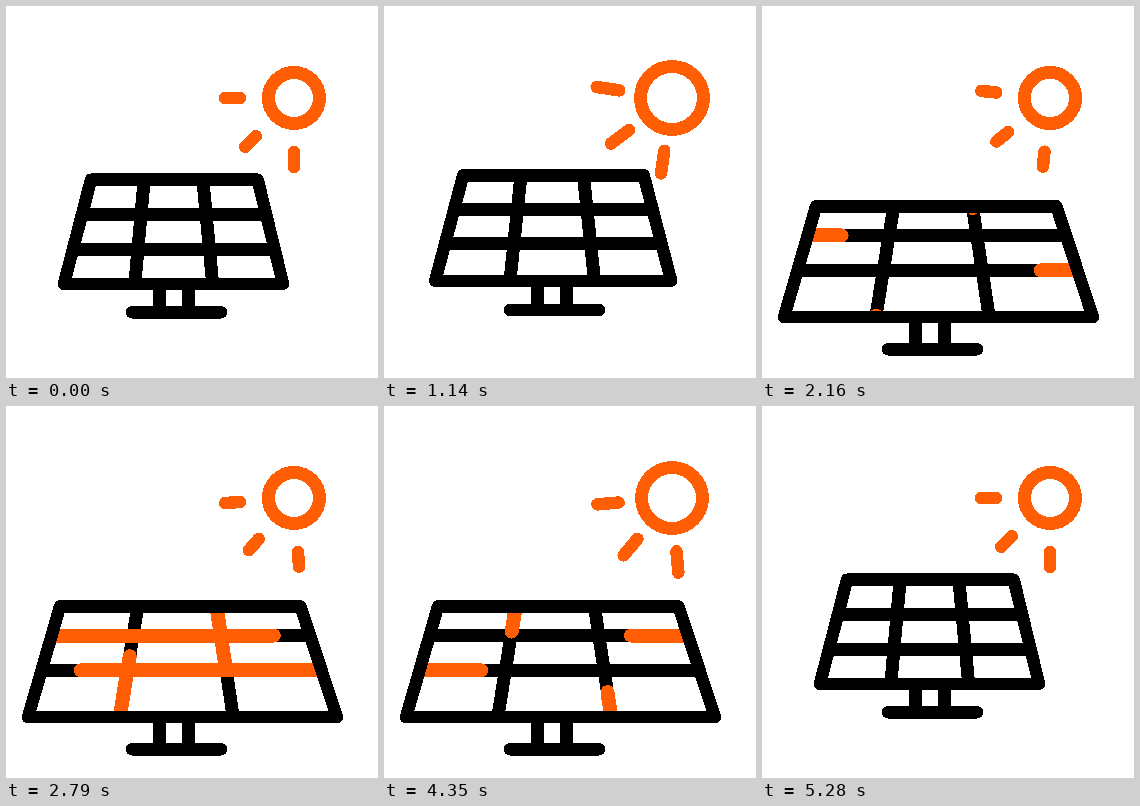
An HTML page for the animation above (5.4 s loop, 372 by 372 pixels).

```html
<!DOCTYPE html>
<html lang="en">
<head>
<meta charset="utf-8">
<title>Solar panel</title>
<style>
html, body { margin: 0; width: 100%; height: 100%; overflow: hidden; background: #fff; }
svg { display: block; width: 100vw; height: 100vh; shape-rendering: crispEdges; }
path, circle { fill: none; stroke: #000; stroke-width: 13; stroke-linejoin: round; }
.round { stroke-linecap: round; }
.hot { stroke: #ff5e05; }
#frame, #rays, #foot { stroke-width: 12.5; }
#flow { stroke-width: 14; }
</style>
</head>
<body>
<svg viewBox="0 0 372 372">
  <circle id="sun" class="hot" cx="288" cy="92" r="25.5"/>
  <path id="rays" class="hot round"/>
  <path id="posts"/>
  <path id="foot" class="round"/>
  <path id="grid"/>
  <path id="flow" class="hot round"/>
  <path id="frame"/>
</svg>
<script>
const LOOP = 5400;
const LIFT = 11.5;

// Two poses: corner and divider x positions, then heights
const SMALL = { tl: 85, tr: 251.7, bl: 58, br: 277, v1t: 138, v1b: 129, v2t: 197, v2b: 206.5,
  top: 173.7, row1: 208.5, row2: 243, bottom: 277.8, foot: 306.3 };
const LARGE = { tl: 54, tr: 294.5, bl: 22, br: 331, v1t: 131.5, v1b: 114, v2t: 210.7, v2b: 227,
  top: 200.5, row1: 229.5, row2: 264.3, bottom: 311.2, foot: 343.3 };
const HEIGHTS = ['top', 'row1', 'row2', 'bottom', 'foot'];

const lerp = (a, b, k) => a + (b - a) * k;
const ease = (t, from, to) => {
  const u = Math.min(1, Math.max(0, (t - from) / (to - from)));
  return (1 - Math.cos(Math.PI * u)) / 2;
};
const bell = (t, from, to) => {
  const mid = (from + to) / 2;
  return ease(t, from, mid) - ease(t, mid, to);
};
const line = (x1, y1, x2, y2) =>
  `M${x1.toFixed(2)} ${y1.toFixed(2)}L${x2.toFixed(2)} ${y2.toFixed(2)}`;
const part = ([x1, y1, x2, y2], a, b) => line(
  lerp(x1, x2, a), lerp(y1, y2, a), lerp(x1, x2, b), lerp(y1, y2, b));
const put = (id, d) => document.getElementById(id).setAttribute('d', d);

function drawSun(t) {
  const pulse = bell(t, 180, 2220) + bell(t, 3020, 5110);
  const turn = 10.5 * ease(t, 180, 1560) - 20.2 * ease(t, 1560, 3450) + 9.7 * ease(t, 3450, 5250);
  document.getElementById('sun').setAttribute('r', 25.5 + 6 * pulse);
  const inner = 54 - 0.6 * pulse, outer = 69 + 7.2 * pulse;
  put('rays', [90, 135, 180].map(deg => {
    const a = (deg + turn) * Math.PI / 180, c = Math.cos(a), s = Math.sin(a);
    return line(288 + inner * c, 92 + inner * s, 288 + outer * c, 92 + outer * s);
  }).join(''));
}

function panelPose(t) {
  const back = t > 4000;
  const grow = back ? 1 - ease(t, 4590, 5280) : ease(t, 720, 2190);
  const lift = back ? 0 : LIFT * ease(t, 180, 720);
  const pose = {};
  for (const key in SMALL) {
    const start = SMALL[key] - (HEIGHTS.includes(key) ? lift : 0);
    pose[key] = lerp(start, LARGE[key], grow);
  }
  return pose;
}

function drawPanel(t) {
  const p = panelPose(t);
  const row = y => {
    const k = (y - p.top) / (p.bottom - p.top);
    return [lerp(p.tl, p.bl, k) + 1, y, lerp(p.tr, p.br, k) - 1, y];
  };
  const [l1, y1, r1] = row(p.row1);
  const [l2, y2, r2] = row(p.row2);
  const high = p.top + 1.5, low = p.bottom - 1.5;
  // Each line runs in the direction its colour flows
  const rows = [[l1, y1, r1, y1], [r2, y2, l2, y2]];
  const cols = [[p.v1b, low, p.v1t, high], [p.v2t, high, p.v2b, low]];

  put('frame', `M${p.tl} ${p.top}L${p.tr} ${p.top}L${p.br} ${p.bottom}L${p.bl} ${p.bottom}Z`);
  put('grid', [...rows, ...cols].map(s => part(s, 0, 1)).join(''));
  put('posts', line(153.5, p.bottom, 153.5, p.foot) + line(182, p.bottom, 182, p.foot));
  put('foot', line(126, p.foot, 215, p.foot));

  const tail = ease(t, 3570, 4700);
  const flow = (lines, from) => {
    const head = ease(t, from, from + 1200);
    return head > tail ? lines.map(s => part(s, tail, head)).join('') : '';
  };
  put('flow', flow(rows, 1880) + flow(cols, 2150));
}

function draw(now) {
  const t = now % LOOP;
  drawSun(t);
  drawPanel(t);
}

let begin = null;
function tick(now) {
  if (begin === null) begin = now;
  draw(now - begin);
  requestAnimationFrame(tick);
}
draw(0);
requestAnimationFrame(tick);
</script>
</body>
</html>
```
